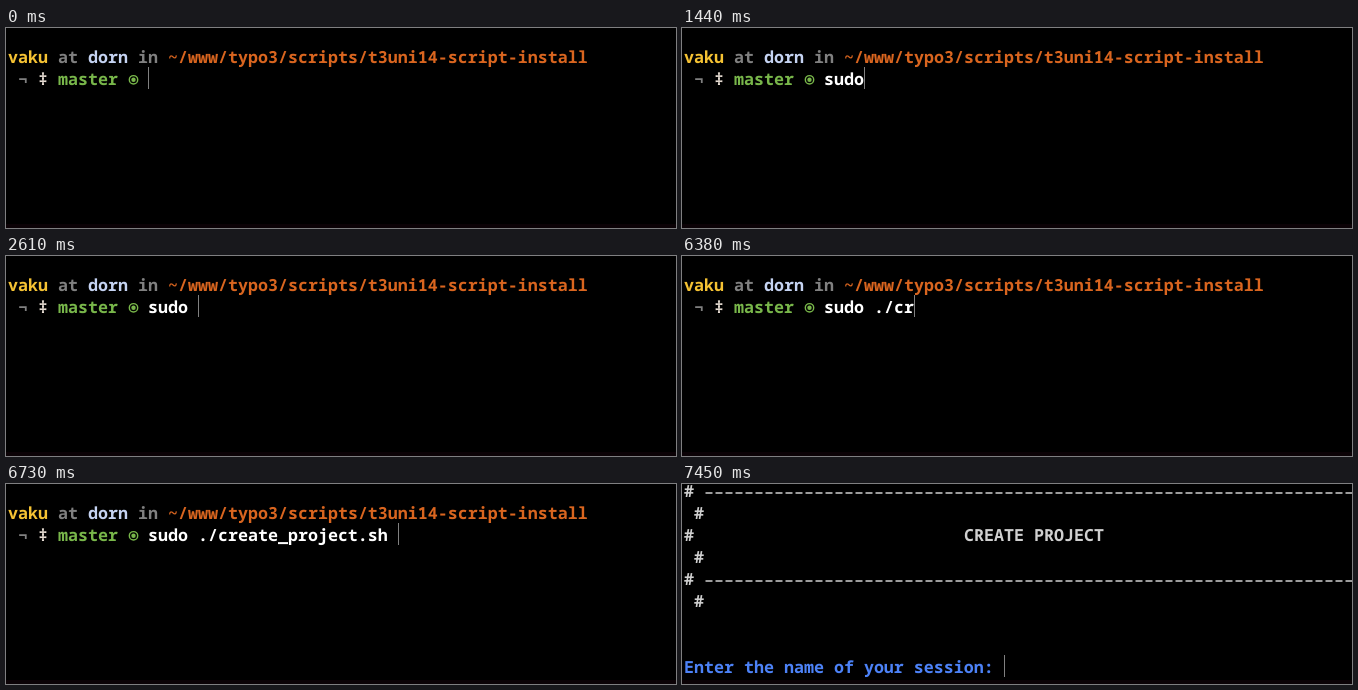
Recreate the animation shown at these times as an HTML page. Size 670 by 200 pixels, loop 8 s.

```html
<!DOCTYPE html>
<html lang="en">
<head>
<meta charset="utf-8">
<title>Terminal</title>
<style>
html, body { margin: 0; width: 100%; height: 100%; overflow: hidden; background: #000; }
svg { display: block; width: 670px; height: 200px; }
text {
  font: 600 16.667px "Noto Sans Mono", "DejaVu Sans Mono", monospace;
  white-space: pre;
  text-rendering: geometricPrecision;
}
</style>
</head>
<body>
<svg viewBox="0 0 670 200">
  <rect width="670" height="200" fill="#000"/>
  <rect y="196" width="670" height="4" fill="#0b0206"/>
  <g id="shell"></g>
  <g id="script"></g>
  <rect id="cursor" width="1" height="22" fill="#808080"/>
</svg>
<script>
const LOOP = 8000, CELL = 10, LINE = 22, LEFT = 2;
const RUN = 7360, ASK = 7450;
const COMMAND = 'sudo ./create_project.sh ';
const QUESTION = 'Enter the name of your session: ';
const PROMPT_COL = 14;

// Time of each key press; the last one completes the whole command.
const KEYS = [1080, 1170, 1350, 1440, 2610, 5310, 5840, 6200, 6380, 6550];
const COMPLETE = 6730;

const $ = id => document.getElementById(id);
const shell = $('shell'), script = $('script'), cursor = $('cursor');
const colX = col => LEFT + col * CELL;

function add(parent, tag, attrs) {
  const el = document.createElementNS('http://www.w3.org/2000/svg', tag);
  for (const key in attrs) el.setAttribute(key, attrs[key]);
  return parent.appendChild(el);
}

function write(parent, col, row, string, fill) {
  const el = add(parent, 'text', { x: colX(col), y: 13 + row * LINE, fill });
  el.textContent = string;
  return el;
}

const GREEN = '#78b64a', GREY = '#808080', LIGHT = '#d0d0d0';

write(shell, 0, 1, 'vaku', '#f5c233');
write(shell, 5, 1, 'at', GREY);
write(shell, 8, 1, 'dorn', '#c5d3f2');
write(shell, 13, 1, 'in', GREY);
write(shell, 16, 1, '~/www/typo3/scripts/t3uni14-script-install', '#d9651f');
write(shell, 1, 2, '¬', GREY);
write(shell, 3, 2, '‡', '#e6dcd2');
write(shell, 5, 2, 'master', GREEN);
add(shell, 'circle', { cx: 127.5, cy: 51.8, r: 4.2, fill: 'none', stroke: GREEN, 'stroke-width': 1.4 });
add(shell, 'circle', { cx: 127.5, cy: 51.8, r: 2.2, fill: GREEN });
const typed = write(shell, PROMPT_COL, 2, '', '#fff');

for (let row = 0; row < 6; row++) write(script, row % 2, row, '#', LIGHT);
for (const row of [0, 4]) {
  const y = 9 + row * LINE;
  add(script, 'line', {
    x1: 23.5, x2: 670, y1: y, y2: y,
    stroke: LIGHT, 'stroke-width': 1.6, 'stroke-dasharray': '7 3'
  });
}
write(script, 28, 2, 'CREATE PROJECT', LIGHT);
const question = write(script, 0, 8, '', '#4c82f7');

function moveCursor(col, row) {
  cursor.setAttribute('x', colX(col));
  cursor.setAttribute('y', row * LINE - 5);
}

function draw(t) {
  const running = t >= RUN;
  shell.style.display = running ? 'none' : '';
  script.style.display = running ? '' : 'none';
  if (running) {
    question.textContent = t >= ASK ? QUESTION : '';
    moveCursor(question.textContent.length, 8);
  } else {
    const count = t >= COMPLETE ? COMMAND.length : KEYS.filter(key => key <= t).length;
    typed.textContent = COMMAND.slice(0, count);
    moveCursor(PROMPT_COL + count, 2);
  }
}

const start = performance.now();
function tick() {
  draw((performance.now() - start) % LOOP);
  requestAnimationFrame(tick);
}
tick();
</script>
</body>
</html>
```
